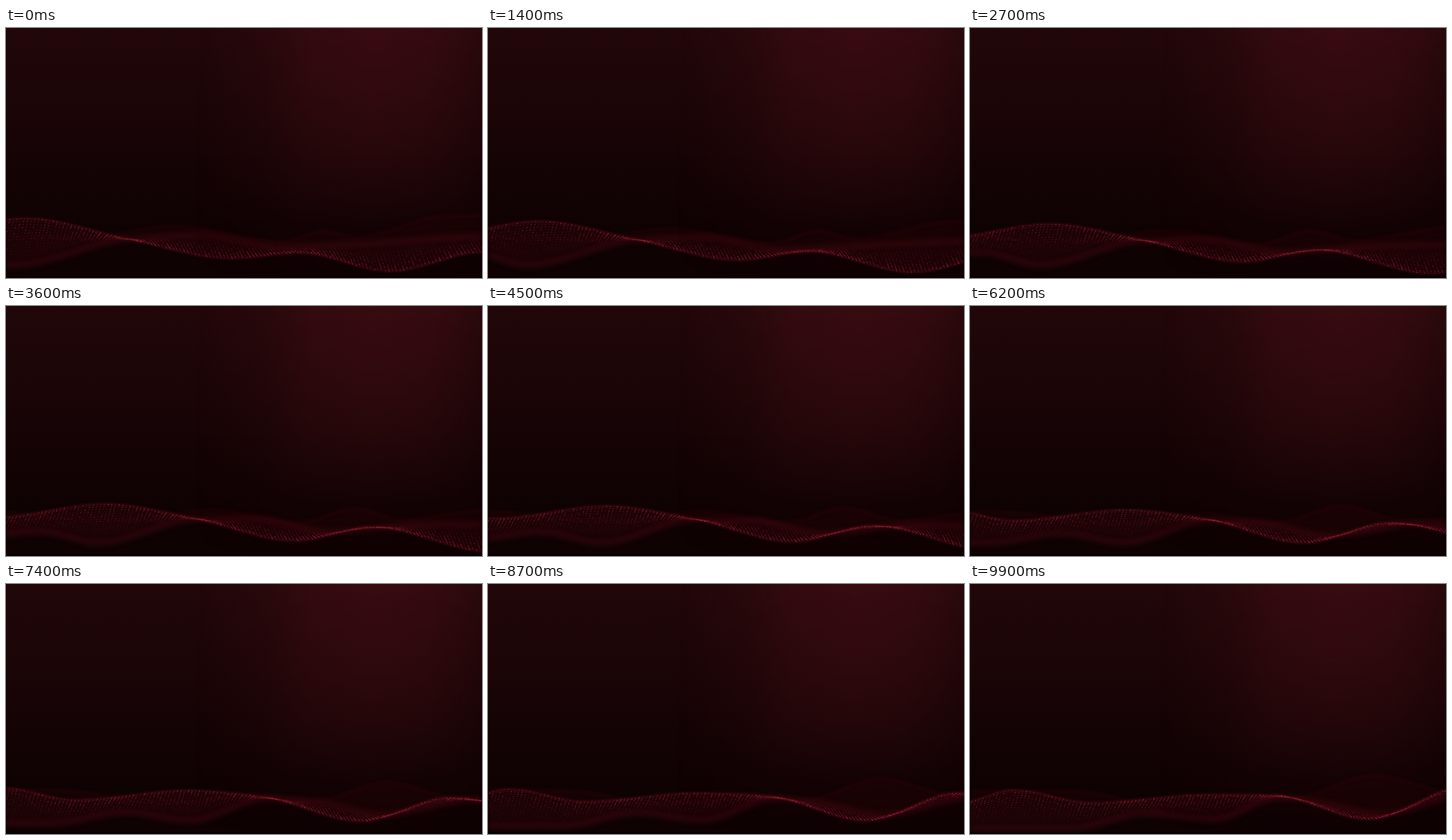
Recreate the animation shown at these times as an HTML page with a canvas. Size 600 by 316 pixels, loop 10 s.

```html
<!DOCTYPE html>
<html lang="en">
<head>
<meta charset="utf-8">
<title>Red particle wave</title>
<style>
html, body { margin: 0; width: 100%; height: 100%; overflow: hidden; background: #0e0203; }
.stage {
  position: relative; width: 600px; height: 316px; overflow: hidden;
  background: linear-gradient(#21070a, #1b0507 32%, #130304 62%, #0f0203 80%, #0e0203);
}
.glow {
  position: absolute; inset: 0;
  background: linear-gradient(92deg, transparent 40%, rgba(60,12,18,.3) 54%, rgba(60,12,18,.68) 63%,
    rgba(60,12,18,.85) 76%, rgba(60,12,18,.75) 87%, rgba(60,12,18,.5) 94%, rgba(60,12,18,.22));
  -webkit-mask-image: linear-gradient(#000, rgba(0,0,0,.52) 50%, rgba(0,0,0,.14) 78%, transparent);
  mask-image: linear-gradient(#000, rgba(0,0,0,.52) 50%, rgba(0,0,0,.14) 78%, transparent);
}
canvas { position: absolute; left: 0; top: 0; }
</style>
</head>
<body>
<div class="stage"><div class="glow"></div><canvas id="wave" width="600" height="316"></canvas></div>
<script>
const W = 600, H = 316, LOOP = 10000, STEP = 100;
const ctx = document.getElementById('wave').getContext('2d');

// Crests and troughs: x, y at the start of the loop, then x, y at its end.
const FRONT = [
  [-260, 268, -10, 277], [-180, 250, 57, 261], [-110, 262, 155, 277],
  [25, 241, 300, 267], [155, 267, 385, 267], [285, 291, 505, 297],
  [370, 284, 625, 256], [485, 307, 840, 290], [600, 283, 960, 270]
];
const SOFT = [
  [-150, 285, 130, 310], [-60, 283, 225, 291], [5, 301, 310, 298],
  [155, 267, 395, 270], [240, 261, 440, 275], [350, 276, 520, 290],
  [450, 272, 640, 264], [600, 263, 790, 265]
];
const BACK = [
  [-140, 258, 128, 262], [100, 266, 250, 280], [210, 251, 345, 267],
  [350, 270, 405, 271], [400, 257, 510, 242], [440, 265, 610, 262],
  [560, 237, 740, 262]
];

// Points travel steadily and sag towards the right halfway through.
function pose([x0, y0, x1, y1], k) {
  const x = x0 + (x1 - x0) * k;
  return [x, y0 + (y1 - y0) * k + 40 * k * (1 - k) * (x / W) ** 2];
}

// Monotone cubic curve sampled once per pixel column.
function sample(points, k) {
  const p = points.map(q => pose(q, k)), n = p.length;
  const d = p.slice(1).map((q, i) => (q[1] - p[i][1]) / (q[0] - p[i][0]));
  const m = p.map((q, i) => {
    if (i === 0 || i === n - 1 || d[i - 1] * d[i] <= 0) return 0;
    return 2 * d[i - 1] * d[i] / (d[i - 1] + d[i]);
  });
  const ys = [];
  let j = 0;
  for (let x = 0; x <= W; x++) {
    while (j < n - 2 && x > p[j + 1][0]) j++;
    const h = p[j + 1][0] - p[j][0];
    const s = Math.min(1, Math.max(0, (x - p[j][0]) / h)), s2 = s * s, s3 = s2 * s;
    ys.push((2 * s3 - 3 * s2 + 1) * p[j][1] + (s3 - 2 * s2 + s) * h * m[j] +
      (3 * s2 - 2 * s3) * p[j + 1][1] + (s3 - s2) * h * m[j + 1]);
  }
  return ys;
}

function trace(ys) {
  ctx.beginPath();
  ys.forEach((y, x) => ctx.lineTo(x, y));
}

function line(ys, width, alpha, blur) {
  ctx.filter = `blur(${blur}px)`;
  ctx.lineWidth = width;
  ctx.strokeStyle = `rgba(140,28,44,${alpha})`;
  trace(ys);
  ctx.stroke();
  ctx.filter = 'none';
}

function band(top, bottom, alpha, blur) {
  ctx.filter = `blur(${blur}px)`;
  ctx.fillStyle = `rgba(120,22,36,${alpha})`;
  trace(top);
  for (let x = W; x >= 0; x--) ctx.lineTo(x, bottom[x]);
  ctx.fill();
  ctx.filter = 'none';
}

function noise(a, b) {
  const v = Math.sin(a * 12.9898 + b * 78.233) * 43758.5453;
  return v - Math.floor(v);
}

function dots(front, soft, t) {
  const gap = 4.6, rows = 17, drift = t * 0.023;
  const first = Math.floor(-drift / gap) - 1;
  const last = Math.ceil((W + 14 - drift) / gap);
  ctx.fillStyle = '#b02e42';
  for (let c = first; c <= last; c++) {
    for (let r = 0; r < rows; r++) {
      const v = r / (rows - 1), x = c * gap + drift - 12 * v;
      if (x < 0 || x > W) continue;
      const i = Math.round(x), y = front[i] + (soft[i] - front[i]) * v;
      const spark = noise(c, r);
      ctx.globalAlpha = (0.05 + 0.56 * (1 - v) ** 1.6) * (0.45 + 0.75 * spark);
      const size = 0.8 + 0.6 * spark;
      ctx.fillRect(x - size / 2, y - size / 2, size, size);
    }
  }
  ctx.globalAlpha = 1;
}

function draw(t) {
  const [front, soft, back] = [FRONT, SOFT, BACK].map(c => sample(c, t / LOOP));
  const upper = front.map((y, x) => Math.min(y, soft[x]));
  const lower = front.map((y, x) => Math.max(y, soft[x]));
  ctx.clearRect(0, 0, W, H);
  band(back.map((y, x) => Math.min(y, upper[x])), upper, 0.08, 3);
  line(back, 3, 0.12, 2);
  band(upper, lower, 0.13, 2.5);
  line(soft, 6, 0.2, 3);
  line(front, 2.5, 0.3, 1.4);
  dots(front, soft, t);
  ctx.fillStyle = '#080102';
  ctx.fillRect(0, H - 2, W, 2);
}

const start = performance.now();
let shown = -1;
function tick() {
  const now = Math.max(0, performance.now() - start) % LOOP;
  const t = Math.floor(now / STEP) * STEP;
  if (t !== shown) draw(shown = t);
  requestAnimationFrame(tick);
}
tick();
</script>
</body>
</html>
```
